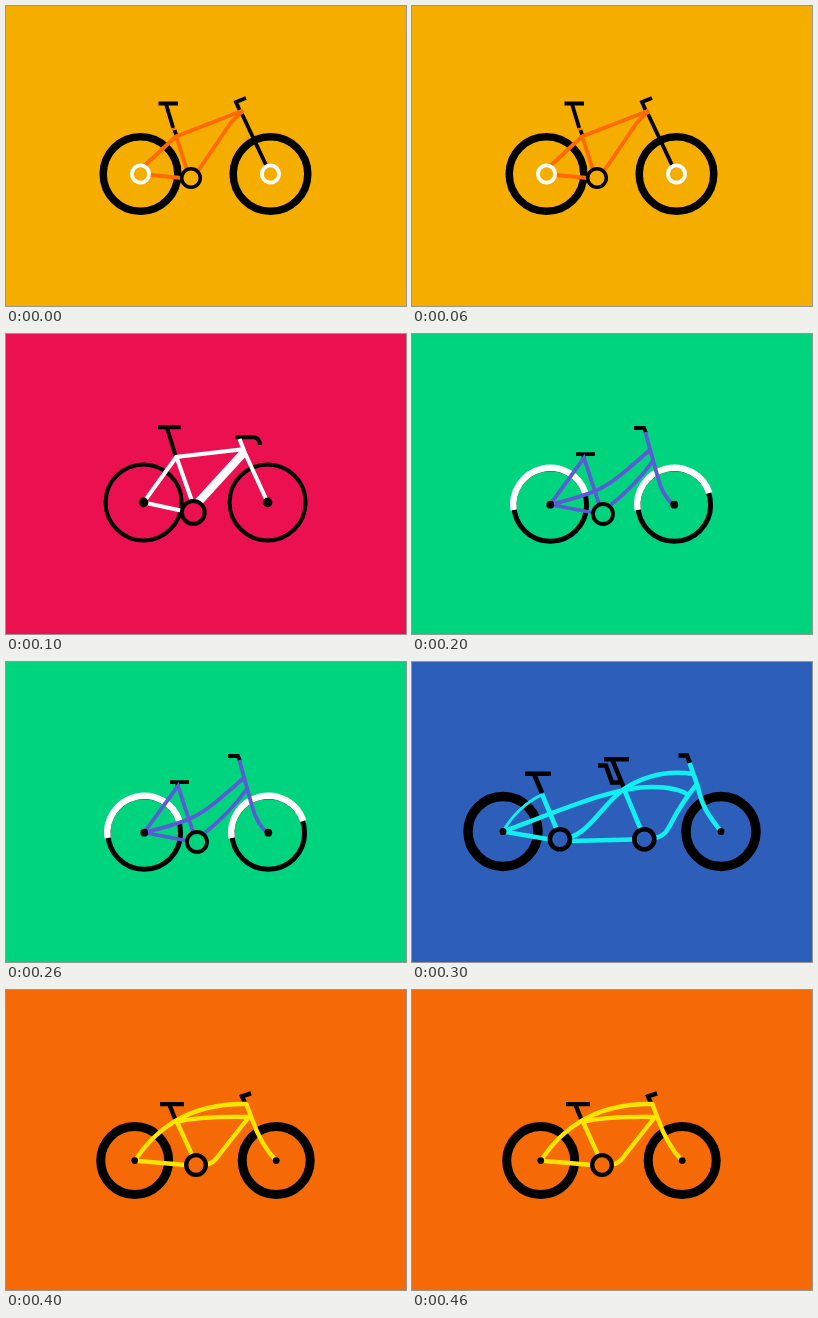
These frames come from a looping animation (400 by 300 pixels, 500 ms). An HTML page:

```html
<!DOCTYPE html>
<html lang="en">
<head>
<meta charset="utf-8">
<title>Bicycles</title>
<style>
html, body { margin: 0; width: 100%; height: 100%; overflow: hidden; }
svg { display: block; width: 100vw; height: 100vh; }
.bike { visibility: hidden; fill: none; stroke: #000; animation: show 500ms step-end infinite; animation-delay: calc(var(--i) * 100ms - 500ms); }
.bg, .crank { fill: var(--bg); }
.bg { stroke: none; }
.frame { stroke: var(--frame); }
.hub { fill: #000; stroke: none; }
.white { stroke: #fff; }
@keyframes show {
  0% { visibility: visible; }
  20%, 100% { visibility: hidden; }
}
</style>
</head>
<body>
<svg viewBox="0 0 400 300">
  <!-- Mountain bike -->
  <g class="bike" style="--i:0; --bg:#f5ad00; --frame:#ff6a00" stroke-width="3.8">
    <rect class="bg" width="400" height="300"/>
    <g stroke-width="7.5">
      <circle cx="134.5" cy="168" r="37.3"/>
      <circle cx="264.5" cy="168" r="37.3"/>
    </g>
    <path d="M152.5 97.5H172M160 98L167.2 122M168.6 124L170.3 129.5M240 92L230 96L233.5 104M236 108L260 159"/>
    <path class="frame" d="M138 160L170 130.5L237 104.5M170 130L181 164M144 169L176 172M192 165L225 116.5L237 104.5M167.3 122L168 124"/>
    <circle class="crank" cx="185" cy="172" r="9.3" stroke-width="3.5"/>
    <g class="white">
      <circle class="crank" cx="134.5" cy="168" r="8.6"/>
      <circle class="crank" cx="264.5" cy="168" r="8.6"/>
    </g>
  </g>

  <!-- Road bike -->
  <g class="bike" style="--i:1; --bg:#eb104f; --frame:#fff" stroke-width="4">
    <rect class="bg" width="400" height="300"/>
    <circle cx="137.6" cy="168.4" r="38"/>
    <circle cx="261.6" cy="168.4" r="38"/>
    <path d="M152 93.3H174.7M161 94L169.5 121.5M229.5 103.2H247Q253.5 103.2 254 111"/>
    <path class="frame" d="M176 176.7L137.6 168.4L170.3 123L239 115M170.3 122.5L186.3 168M233.5 105L239 119L261.6 168.4"/>
    <path class="frame" d="M192 168.5L238.3 118" stroke-width="8.4"/>
    <circle class="crank" cx="187.3" cy="178.4" r="11.4"/>
    <circle class="hub" cx="137.6" cy="168.4" r="4.8"/>
    <circle class="hub" cx="261.6" cy="168.4" r="4.8"/>
  </g>

  <!-- City bike -->
  <g class="bike" style="--i:2; --bg:#00d47e; --frame:#5b5bd6" stroke-width="3.8">
    <rect class="bg" width="400" height="300"/>
    <g stroke-width="5">
      <circle cx="138.3" cy="171" r="36.3"/>
      <circle cx="262.3" cy="171" r="36.3"/>
    </g>
    <g class="white" stroke-width="6.5">
      <path d="M101.6 176A37 37 0 0 1 173.3 159"/>
      <path d="M225.6 176A37 37 0 0 1 297.3 159"/>
    </g>
    <path d="M164 120.2H183M171.5 120V125M222 94H232L234 99"/>
    <path class="frame" d="M180 178.5L138.3 170.5L172 124L187 170M138.3 170.5C194 157 195 153 239 115M197 172.5Q225 150 241.5 126M233.3 98L246 144Q251 163 262 171"/>
    <circle class="crank" cx="191" cy="180" r="10"/>
    <circle class="hub" cx="138.3" cy="170.7" r="3.9"/>
    <circle class="hub" cx="262.3" cy="170.7" r="3.9"/>
  </g>

  <!-- Tandem -->
  <g class="bike" style="--i:3; --bg:#2d5fba; --frame:#10f0f0" stroke-width="4.6">
    <rect class="bg" width="400" height="300"/>
    <g stroke-width="9.5">
      <circle cx="91" cy="169.5" r="35"/>
      <circle cx="309" cy="169.5" r="35"/>
    </g>
    <path d="M113 111.7H139M122 112L130 131M192 97.2H217M200 97L211.5 125M186 103.5H194L200 120.5H209M266.5 93.5H275L278 101"/>
    <path class="frame" d="M91 169.5Q105 145 130 132.5" stroke-width="3"/>
    <path class="frame" d="M130 132L145 168M91 169.5L137 177.3M159 179L221 177.5M212 127L229 168M91 169.5C150 148 200 125 240 125Q266 125 278 134M157 175.5C178 170 190 143 212 127C232 114 255 108 281 112M242 176.5C262 171 252 162 285 122M277.5 101L286 125C290 145 297 154 309 169.5"/>
    <circle class="crank" cx="147.9" cy="177.3" r="10"/>
    <circle class="crank" cx="232.3" cy="177.3" r="10"/>
    <circle class="hub" cx="91" cy="169.5" r="3.5"/>
    <circle class="hub" cx="309" cy="169.5" r="3.5"/>
  </g>

  <!-- Cruiser -->
  <g class="bike" style="--i:4; --bg:#f56907; --frame:#ffe600" stroke-width="4.3">
    <rect class="bg" width="400" height="300"/>
    <g stroke-width="9">
      <circle cx="128.7" cy="170.6" r="34"/>
      <circle cx="270.2" cy="170.6" r="34"/>
    </g>
    <path d="M154 114.2H178M163.5 115L170 131M245 103.4L236 106.4L239 113"/>
    <path class="frame" d="M180 175L128.7 170.6C147 143 178 113 241 114M170 132Q194 126 244 127M171 132L187 167M200 174.5Q207 174 213 165L243.7 126M240 113L246 129Q255 155 270 170.6"/>
    <circle class="crank" cx="190" cy="175" r="9.8"/>
    <circle class="hub" cx="128.7" cy="170.6" r="3.4"/>
    <circle class="hub" cx="270.2" cy="170.6" r="3.4"/>
  </g>
</svg>
</body>
</html>
```
